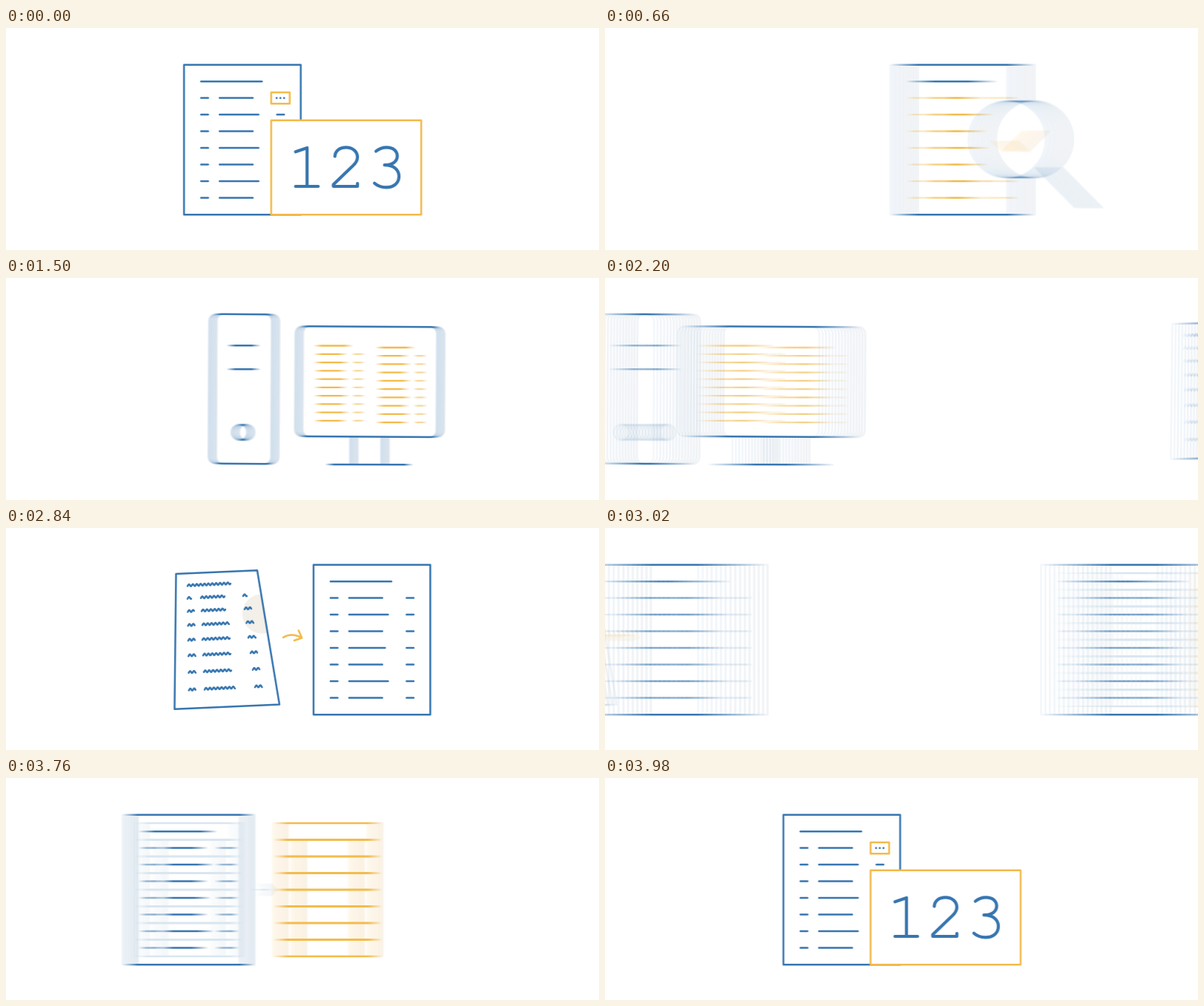
Recreate the animation shown at these times as an HTML page with a canvas. Size 800 by 300 pixels, loop 4000 ms.

```html
<!DOCTYPE html>
<html lang="en">
<head>
<meta charset="utf-8">
<title>Document steps</title>
<style>
  html, body { margin: 0; width: 100%; height: 100%; overflow: hidden; background: #fff; }
  canvas { display: block; }
</style>
</head>
<body>
<canvas id="stage" width="800" height="300"></canvas>
<script>
const W = 800, H = 300, LOOP = 4000, HOLD = 800, SCENES = 5;
const BLUE = '#3d7ab3', YELLOW = '#f3bc50', PALE = '#dae6f0';
const ROW_YS = [94.6, 117.1, 139.6, 162.1, 184.6, 207.1, 229.6];

const strip = document.createElement('canvas');
strip.width = W * (SCENES + 1);
strip.height = H;
const ctx = strip.getContext('2d');

function stroke(path, color = BLUE, width = 2.5, fill) {
  const p = typeof path === 'string' ? new Path2D(path) : path;
  if (fill) { ctx.fillStyle = fill; ctx.fill(p); }
  ctx.strokeStyle = color;
  ctx.lineWidth = width;
  ctx.stroke(p);
}

const line = (x1, y1, x2, y2, color, width) =>
  stroke(`M${x1} ${y1}L${x2} ${y2}`, color, width);

function box(x, y, w, h, color, width, fill) {
  const p = new Path2D();
  p.rect(x, y, w, h);
  stroke(p, color, width, fill);
}

function tiltedBox(x, y, w, h, radius) {
  const p = new Path2D();
  p.roundRect(-w / 2, -h / 2, w, h, radius);
  ctx.save();
  ctx.translate(x + w / 2, y + h / 2);
  ctx.rotate(0.005);
  stroke(p);
  ctx.restore();
}

function circle(x, y, r, fill) {
  const p = new Path2D();
  p.arc(x, y, r, 0, 2 * Math.PI);
  stroke(p, BLUE, 2.5, fill);
}

// Title and three text columns; x is the left end of the text.
function textLines(x, color, fourth = 48.5, lastColumn = ROW_YS) {
  line(x, 72.2, x + 82, 72.2);
  ROW_YS.forEach((y, i) => {
    const width = i === 3 ? fourth : i % 2 ? 52.5 : 44.7;
    line(x, y, x + 9.5, y, color);
    line(x + 25, y, x + 25 + width, y, color);
    if (lastColumn.includes(y)) line(x + 102.5, y, x + 112, y, color);
  });
}

const page = x => box(x, 49.8, 157.5, 202.4, BLUE);

function squiggle(x1, x2, baseY) {
  const p = new Path2D();
  for (let x = x1; x <= x2; x += 0.5) {
    const y = baseY - (x - 250) * 0.048 - 1.4 * Math.sin((x - x1) * 1.2 - 0.8);
    x === x1 ? p.moveTo(x, y) : p.lineTo(x, y);
  }
  stroke(p);
}

function grid(x, color) {
  box(x, 61, 127.5, 180, color, 2.6);
  for (let i = 0; i < 7; i++) line(x, 83.5 + i * 22.5, x + 127.5, 83.5 + i * 22.5, color, 2.8);
  for (const dx of [25, 102.5]) line(x + dx, 83.5, x + dx, 241, color, 2.8);
}

function numberScene() {
  page(240);
  textLines(263, BLUE, 52.5, [ROW_YS[1]]);
  box(357.6, 87, 25, 15.2, YELLOW);
  ctx.fillStyle = BLUE;
  for (const x of [365, 370, 375]) {
    ctx.beginPath();
    ctx.arc(x, 94.7, 1.35, 0, 7);
    ctx.fill();
  }
  box(357.6, 124.8, 202.4, 127.4, YELLOW, 2.5, '#fff');
  stroke('M390.5 167.3L406 162V214M390.5 214H421', BLUE, 4.2);
  stroke('M443.5 173.5C444 166 450 161.3 458.5 161.3C467.5 161.3 474 167 474 174.5' +
    'C474 179 472 182.5 467.5 186.5L441.5 211.5V214H474V210', BLUE, 4.2);
  stroke('M499 166.5C503 163 507.5 161.3 513.5 161.3C522 161.3 527.7 166 527.7 173' +
    'C527.7 180.5 521 185.2 510.5 185.2C522.5 185.2 530 191 530 200.5' +
    'C530 209.5 523 215.4 512.5 215.4C506 215.4 501 213.5 497 209.8', BLUE, 4.2);
}

function searchScene() {
  page(274.5);
  textLines(297.5, YELLOW);
  circle(431.7, 150.5, 52, '#fff');
  line(468.6, 187.6, 523, 242.6);
  stroke('M410 153.2L425 166.5L452 139.5', YELLOW);
}

function computerScene() {
  tiltedBox(245.5, 49, 84.5, 202, 9);
  line(271.5, 91.3, 303, 91.3);
  line(271.5, 123.3, 303, 123.3);
  circle(286.5, 208.5, 10.6);
  tiltedBox(362, 65.8, 191, 148.7, 9);
  line(436, 215, 436, 251.5);
  line(478, 215, 478, 251.5);
  line(404.5, 252, 509, 252.3);
  for (const [x, top] of [[388.5, 91.6], [472, 93.9]]) {
    line(x, top, x + 39.5, top, YELLOW);
    for (let i = 1; i < 10; i++) {
      const y = top + i * 11.25;
      line(x, y, x + (i % 2 ? 32 : 35), y, YELLOW, 2.2);
      line(x + 51, y, x + 56, y, YELLOW, 2.2);
    }
  }
}

function cleanupScene() {
  const sheet = new Path2D('M229.5 62L339 57.3L369 238.5L227.5 244.8Z');
  ctx.save();
  ctx.clip(sheet);
  ctx.fillStyle = '#f3efe9';
  ctx.beginPath();
  ctx.arc(345.5, 116, 26.5, 0, 7);
  ctx.fill();
  ctx.restore();
  stroke(sheet);
  squiggle(245, 303, 77.3);
  const rows = [
    [94.4, 250, 263, 295, 320, 325], [112.2, 254, 264, 296, 322, 331],
    [131, 255, 265, 301, 324.5, 334], [151, 255, 265, 302, 327, 337],
    [172, 256, 266, 303, 330, 339], [194.6, 256, 267, 304, 333, 342],
    [218.3, 256, 268, 309, 336, 345.5]
  ];
  rows.forEach(([y, end1, start2, end2, start3, end3], i) => {
    squiggle(245 + i * 0.3, end1, y);
    squiggle(start2, end2, y);
    squiggle(start3, end3, y);
  });
  stroke('M374 148C381 143.5 390 143.5 399 148.3M394.8 138.5L399.3 148.5L389 152', YELLOW);
  page(415);
  textLines(438, BLUE);
}

function tableScene() {
  page(235);
  grid(250.3, PALE);
  textLines(258, BLUE);
  stroke('M408 151H423M415.5 143.5L423 151L415.5 158.5', PALE);
  grid(437.6, YELLOW);
}

ctx.fillStyle = '#fff';
ctx.fillRect(0, 0, strip.width, H);
ctx.lineCap = ctx.lineJoin = 'round';
[numberScene, searchScene, computerScene, cleanupScene, tableScene, numberScene].forEach((scene, i) => {
  ctx.save();
  ctx.translate(i * W, 0);
  scene();
  ctx.restore();
});

const SLIDE_START = 354, SLIDE = 532, POWER = 7;
const SHUTTER = 10, SAMPLES = 16, STEP = 20;

function ease(x) {
  const half = v => 0.5 * (2 * v) ** POWER;
  return x >= 1 ? 1 : x < 0.5 ? half(x) : 1 - half(1 - x);
}

function scrollAt(ms) {
  const t = ms - SLIDE_START;
  const index = Math.floor(t / HOLD);
  const pos = index + ease((t - index * HOLD) / SLIDE);
  return ((pos + SCENES) % SCENES) * W;
}

const view = document.getElementById('stage').getContext('2d');

function draw(ms) {
  const from = scrollAt(ms - SHUTTER / 2), to = scrollAt(ms + SHUTTER / 2);
  const samples = Math.abs(to - from) < 0.1 ? 1 : SAMPLES;
  for (let i = 0; i < samples; i++) {
    const offset = samples === 1 ? 0 : ((i + 0.5) / samples - 0.5) * SHUTTER;
    let x = scrollAt(ms + offset);
    if (Math.abs(x - Math.round(x)) < 0.05) x = Math.round(x);
    // Weights 1, 1/2, 1/3 ... keep a running average of the samples.
    view.globalAlpha = 1 / (i + 1);
    view.drawImage(strip, -x, 0);
  }
}

const start = performance.now();
function tick() {
  const elapsed = performance.now() - start + 2;
  draw(Math.floor(elapsed / STEP) * STEP % LOOP);
  requestAnimationFrame(tick);
}
tick();
</script>
</body>
</html>
```
